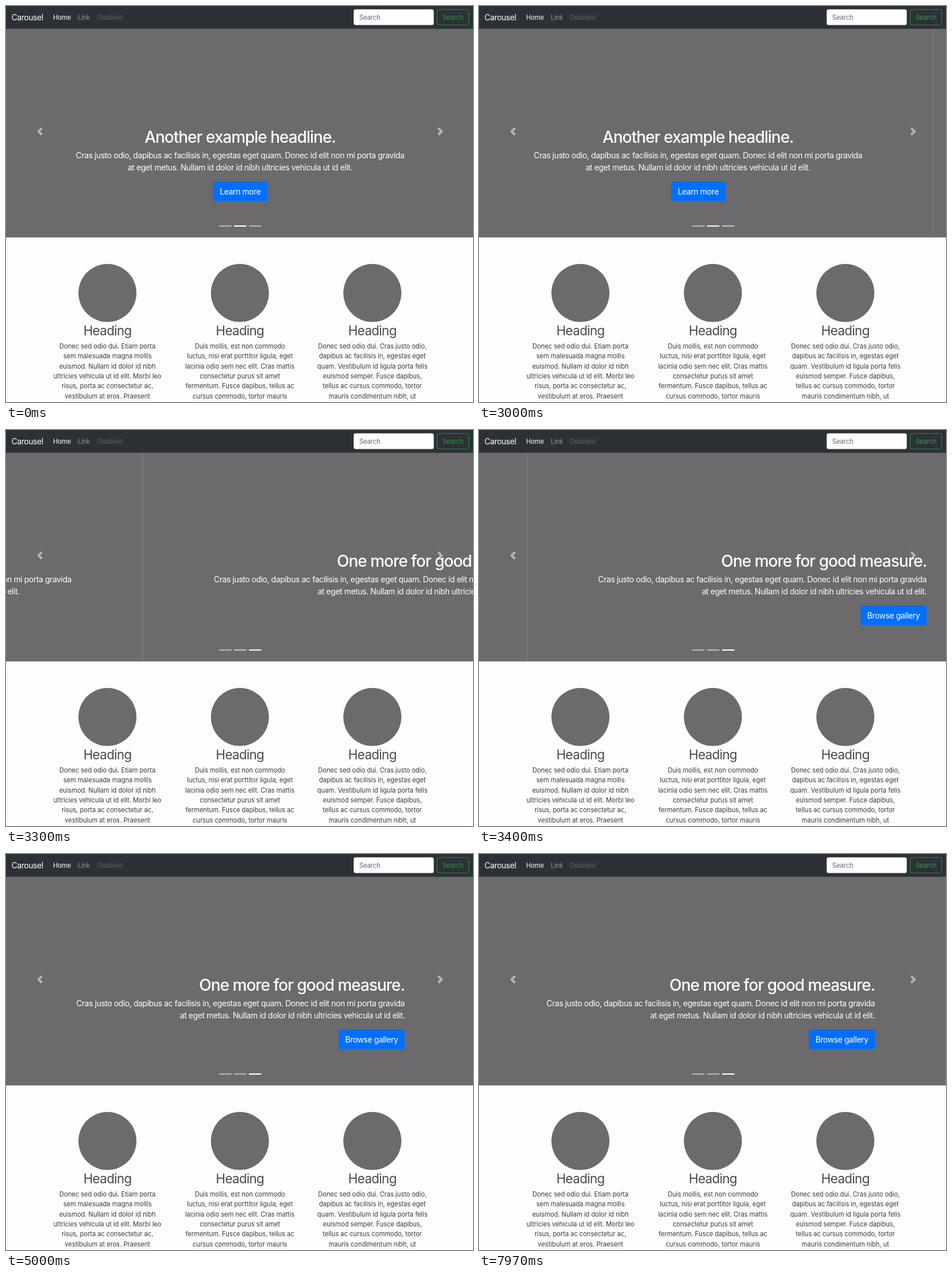
An HTML page that plays this animation: 813 by 689 pixels, repeating every 8 s.

```html
<!DOCTYPE html>
<html lang="en">
<head>
<meta charset="utf-8">
<title>Carousel</title>
<style>
html, body { margin: 0; width: 100%; height: 100%; overflow: hidden; background: #fefcff }
svg { display: block; font-family: Inter, "Liberation Sans", sans-serif }
.nav { font-size: 11.2px; letter-spacing: -.01em }
.title { font-size: 28px; font-weight: 500; letter-spacing: -.036em }
.lead { font-size: 14px; letter-spacing: -.0315em }
.head { font-size: 22.4px; letter-spacing: -.03em; fill: #4a484a }
.copy { font-size: 11.2px; letter-spacing: -.005em; fill: #3c3a3c }
</style>
</head>
<body>
<svg width="813" height="689" viewBox="0 0 813 689">
  <rect y="39" width="813" height="363.7" fill="#6c6a6c"/>
  <g id="slides" fill="#fff"></g>
  <g fill="#fff" opacity=".5">
    <path transform="translate(51.8 211.1) scale(1.8)" d="M5.25 0l-4 4 4 4 1.5-1.5-2.5-2.5 2.5-2.5z"/>
    <path transform="translate(748.8 211.1) scale(1.8)" d="M2.75 0l-1.5 1.5 2.5 2.5-2.5 2.5 1.5 1.5 4-4z"/>
  </g>
  <g id="dots" fill="#fff"></g>
  <rect width="813" height="39.6" fill="#2c3136"/>
  <g class="nav">
    <text class="lead" x="9.5" y="24.5" fill="#fff">Carousel</text>
    <text x="82" y="24" fill="#fff">Home</text>
    <text x="125" y="24" fill="#949698">Link</text>
    <text x="158" y="24" fill="#606467">Disabled</text>
    <rect x="605.5" y="6" width="139" height="27" rx="3" fill="#fefcff" stroke="#c8ced6" stroke-width=".7"/>
    <text x="615" y="24" fill="#5f676f">Search</text>
    <rect x="750.7" y="6.1" width="54.8" height="26.8" rx="3" fill="none" stroke="#2c9f45" stroke-width=".8"/>
    <text x="760" y="24" fill="#2c9f45">Search</text>
  </g>
  <g id="cards" text-anchor="middle"></g>
</svg>
<script>
const WIDTH = 819, PERIOD = 5000, START = 2948, FIRST = 2970;
const $ = id => document.getElementById(id);
const text = (cls, x, y, s) => `<text class="${cls}" x="${x}" y="${y}">${s}</text>`;
const seam = '<rect x="-2" y="40" width="1" height="362.5" opacity=".16"/>';

const lead = ['Cras justo odio, dapibus ac facilisis in, egestas eget quam. Donec id elit non mi porta gravida',
  'at eget metus. Nullam id dolor id nibh ultricies vehicula ut id elit.'];

function slide(anchor, x, title, label, left, width) {
  return `<g text-anchor="${anchor}">${seam}
    ${text('title', x, 238, title)}${lead.map((s, i) => text('lead', x, 265.3 + i * 20.2, s)).join('')}
    <rect x="${left}" y="305.5" width="${width}" height="34" rx="3.5" fill="#006fff"/>
    <g text-anchor="middle">${text('lead', left + width / 2, 327.5, label)}</g></g>`;
}
$('slides').innerHTML = slide('middle', 407.5, 'Another example headline.', 'Learn more', 360.5, 94.5)
  + slide('end', 694, 'One more for good measure.', 'Browse gallery', 579, 115)
  + seam;
$('dots').innerHTML = [0, 1, 2].map(i => `<rect x="${371 + i * 26}" y="381.8" width="21.5" height="2.2"/>`).join('');

$('cards').innerHTML = [
  ['Donec sed odio dui. Etiam porta', 'sem malesuada magna mollis', 'euismod. Nullam id dolor id nibh',
    'ultricies vehicula ut id elit. Morbi leo', 'risus, porta ac consectetur ac,', 'vestibulum at eros. Praesent'],
  ['Duis mollis, est non commodo', 'luctus, nisi erat porttitor ligula, eget', 'lacinia odio sem nec elit. Cras mattis',
    'consectetur purus sit amet', 'fermentum. Fusce dapibus, tellus ac', 'cursus commodo, tortor mauris'],
  ['Donec sed odio dui. Cras justo odio,', 'dapibus ac facilisis in, egestas eget', 'quam. Vestibulum id ligula porta felis',
    'euismod semper. Fusce dapibus,', 'tellus ac cursus commodo, tortor', 'mauris condimentum nibh, ut'],
].map((lines, i) => {
  const x = 176.6 + i * 230.6;
  return `<circle cx="${x}" cy="499.3" r="50.5" fill="#6c6a6c"/>` + text('head', x, 572.5, 'Heading')
    + lines.map((s, j) => text('copy', x, 596 + j * 17.3, s)).join('');
}).join('');

// Ease-in-out: time is quadratic in u, the position a smoothstep of u
function ease(ms) {
  const u = Math.min(1, (Math.sqrt(483 * 483 + 416 * ms) - 483) / 208);
  return u * u * (3 - 2 * u);
}

const slides = [...$('slides').children], dots = [...$('dots').children];
function draw(now) {
  const t = Math.min(now % 8000, 7970);
  const moves = t < FIRST ? 0 : t < FIRST + PERIOD ? 1 : 2;
  const ms = moves ? t - START - (moves - 1) * PERIOD : PERIOD;
  const pos = moves ? moves - 1 + ease(ms) : 0;
  slides.forEach((s, i) => s.setAttribute('transform', `translate(${(i - pos) * WIDTH} 0)`));

  const fade = 1 - (1 - Math.min(1, ms / 600)) ** 2;
  dots.forEach((d, i) => {
    const on = i == (moves + 1) % 3 ? fade : i == moves ? 1 - fade : 0;
    d.setAttribute('opacity', .5 + .5 * on);
  });
  requestAnimationFrame(draw);
}
requestAnimationFrame(draw);
</script>
</body>
</html>
```
